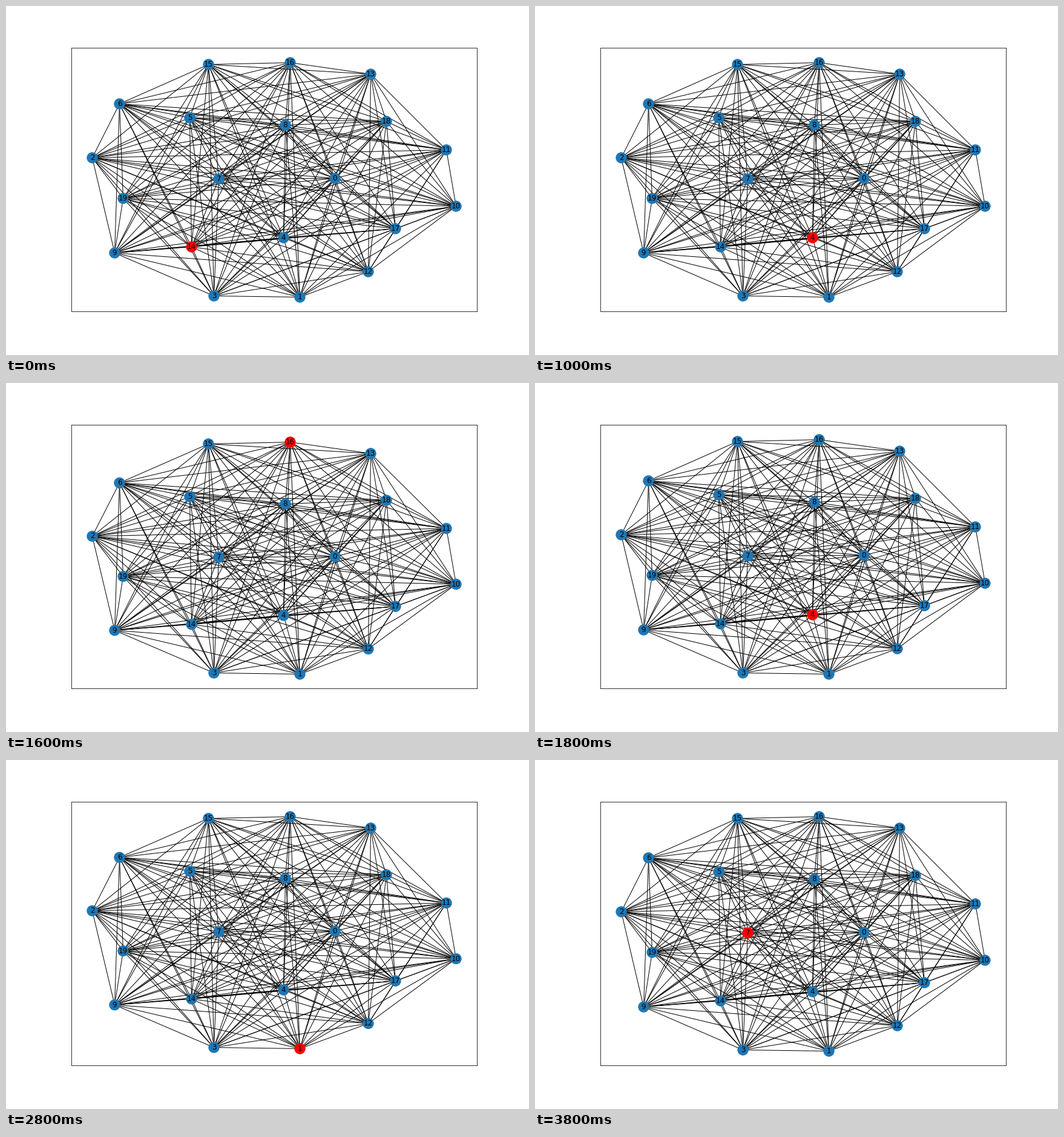
These frames come from a looping animation (864x576 px, 4 s). A matplotlib script:

```python
from itertools import combinations

import matplotlib.pyplot as plt
import numpy as np
from matplotlib.animation import FuncAnimation
from matplotlib.collections import LineCollection

W, H, DPI = 864, 576, 72
BLUE, RED = "#1f77b4", "#ff0000"

# Node centres in stage pixels, y pointing down
NODES = np.array([
    (543, 284), (485, 480), (142, 250), (343, 478), (458, 382),
    (303, 184), (187, 161), (351, 285), (461, 196), (179, 407),
    (743, 330), (727, 237), (598, 438), (602, 112), (306, 397),
    (334, 96), (469, 93), (643, 367), (628, 190), (193, 317),
]) + 0.5
TOP, BOTTOM = 16, 1
SQUEEZE = 0.9895

# Node visited at each step of the random walk
WALK = [14, 9, 17, 6, 8, 4, 11, 8, 16, 4, 12, 4, 7, 18, 1, 12, 18, 6, 18, 7]

EDGES = list(combinations(range(len(NODES)), 2))

plt.rcParams["font.family"] = "DejaVu Sans"
fig = plt.figure(figsize=(W / DPI, H / DPI), dpi=DPI, facecolor="white")
ax = fig.add_axes([0.125, 0.125, 0.775, 0.755])
ax.set(xlim=(0.125 * W, 0.9 * W), ylim=(0.875 * H, 0.12 * H), xticks=[], yticks=[])

edges = LineCollection([], colors="black", linewidths=1, zorder=1)
ax.add_collection(edges, autolim=False)
dots = ax.scatter(*NODES.T, s=300, c=BLUE, linewidths=1, zorder=2)
labels = [ax.text(x, y, str(i), size=12, ha="center", va="center", zorder=3)
          for i, (x, y) in enumerate(NODES)]


def layout(active):
    """An active top or bottom node widens the margin on its side."""
    pos = NODES.copy()
    if active in (TOP, BOTTOM):
        fixed = NODES[BOTTOM if active == TOP else TOP, 1]
        pos[:, 1] = fixed + (pos[:, 1] - fixed) * SQUEEZE
    return pos


def draw(step):
    active = WALK[step]
    pos = layout(active)
    edges.set_segments([pos[[a, b]] for a, b in EDGES])
    dots.set_offsets(pos)
    colors = [RED if i == active else BLUE for i in range(len(pos))]
    dots.set_facecolor(colors)
    dots.set_edgecolor(colors)
    for label, p in zip(labels, pos):
        label.set_position(p)
    return [edges, dots, *labels]


anim = FuncAnimation(fig, draw, frames=len(WALK), interval=200,
                     repeat=True, repeat_delay=0)
plt.show()
```
